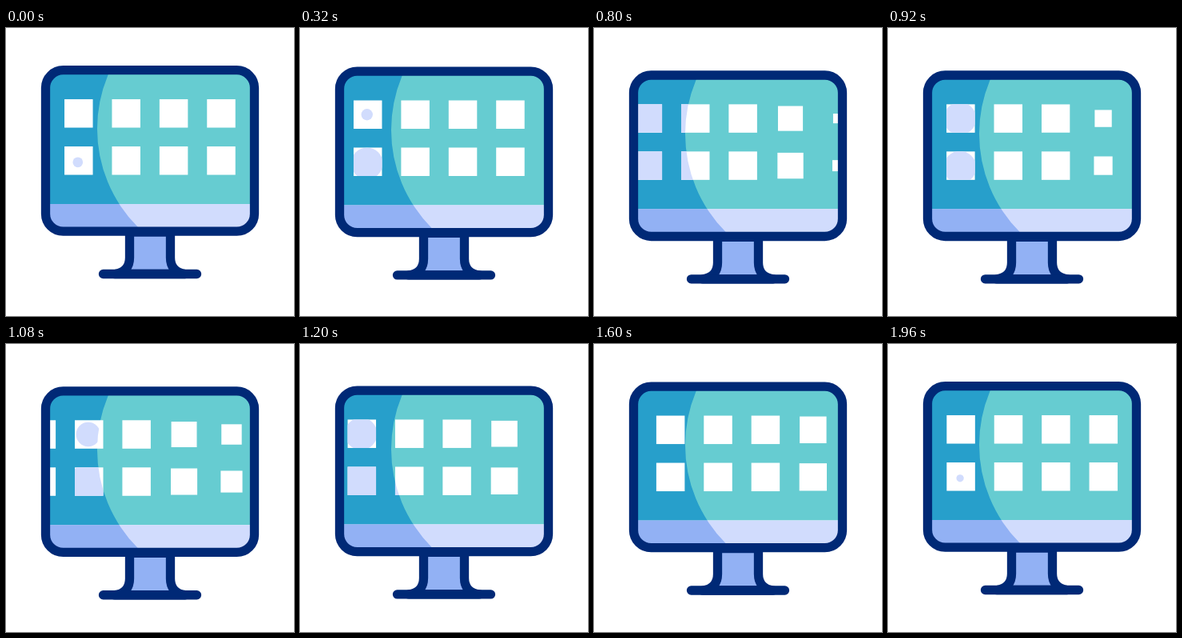
An HTML page with a canvas for the animation above (2 s loop, 360 px wide and 360 px high).

```html
<!DOCTYPE html>
<html lang="en">
<head>
<meta charset="utf-8">
<title>App carousel on a monitor</title>
<style>
html, body { margin: 0; width: 100%; height: 100%; overflow: hidden; background: #fff; }
canvas { display: block; width: 360px; height: 360px; }
</style>
</head>
<body>
<canvas id="stage" width="360" height="360"></canvas>
<script>
const ctx = document.getElementById('stage').getContext('2d');
const LOOP = 2000, PITCH = 59.4, SIZE = 35.5;
const NAVY = '#002976', TEAL = '#66ccd1', BLUE = '#279fcb', PALE = '#d1dcfd', SHADE = '#92b1f4';

// Scroll distance over time: four columns per loop
const SCROLL = [[0, 0], [320, 6], [600, 37], [800, 82.6], [1080, 165],
  [1360, 217], [1700, 236], [1960, 237.3], [2000, 237.6]];
// When each incoming column starts to grow
const GROW = { 4: 270, 5: 535, 6: 640, 7: 1020 };
// Tint ripples per column: start of upper row, start of lower row, end
const TINT = [[[150, -150, 9999]], [[0, 0, 9999]], [[150, 100, 880]],
  [[720, 500, 9999]], [[600, 600, 1400], [2150, 1850, 9999]]];

const clamp = x => Math.max(0, Math.min(1, x));
const ease = (t, start, span) => {
  const x = clamp((t - start) / span);
  return x * x * (3 - 2 * x);
};

// Smooth curve through key points
function curve(keys, t) {
  const last = keys.length - 1;
  const slope = i => i === 0 || i === last ? 0 :
    (keys[i + 1][1] - keys[i - 1][1]) / (keys[i + 1][0] - keys[i - 1][0]);
  let i = 0;
  while (i < last - 1 && t > keys[i + 1][0]) i++;
  const [t0, a] = keys[i], [t1, b] = keys[i + 1];
  const d = t1 - t0, x = (t - t0) / d, y = 1 - x;
  return a * (1 + 2 * x) * y * y + b * x * x * (3 - 2 * x) +
    d * x * y * (slope(i) * y - slope(i + 1) * x);
}

function tintRadius(col, row, t) {
  return Math.max(0, ...(TINT[col] || []).map(p =>
    Math.min(28, Math.max(0, t - p[row]) * 0.042) * (1 - clamp((t - p[2]) / 150))));
}

function fill(color, x, y, w, h) {
  ctx.fillStyle = color;
  ctx.fillRect(x, y, w, h);
}

function clipped(path, rule, draw) {
  ctx.save();
  ctx.clip(path, rule);
  draw();
  ctx.restore();
}

const frame = new Path2D();
frame.roundRect(49.5, 52.7, 261, 201.5, 22);
const shadow = new Path2D('M0 0H360V360H0Z');
shadow.arc(288, 126, 174, 0, 7);
const neck = new Path2D('M154.5 255V287C154.5 298 149 306 136 307.5H224C211 306 205.5 298 205.5 287V255Z');
const base = new Path2D('M121.5 307.5H238.5');

function eachSquare(t, draw) {
  const shift = curve(SCROLL, t);
  for (let col = 0; col < 8; col++) {
    for (let row = 0; row < 2; row++) {
      const size = SIZE * (col < 4 ? 1 : ease(t, GROW[col] - row * 25, 680));
      draw(90.8 + col * PITCH - shift, 106.8 + row * 59, size, col, row);
    }
  }
}

function drawScreen(t) {
  fill(TEAL, 44, 47, 272, 173);
  fill(PALE, 44, 220, 272, 40);
  clipped(shadow, 'evenodd', () => {
    fill(BLUE, 44, 47, 272, 173);
    fill(SHADE, 44, 220, 272, 40);
  });
  eachSquare(t, (x, y, s) => fill('#fff', x - s / 2, y - s / 2, s, s));
  clipped(shadow, 'evenodd', () => eachSquare(t, (x, y, s, col, row) => {
    const r = tintRadius(col, row, t);
    if (!r) return;
    const box = new Path2D();
    box.rect(x - s / 2, y - s / 2, s, s);
    clipped(box, 'nonzero', () => {
      ctx.fillStyle = PALE;
      ctx.beginPath();
      ctx.arc(x - 1, y + row * 2, r, 0, 7);
      ctx.fill();
    });
  }));
}

function draw(t) {
  fill('#fff', 0, 0, 360, 360);
  ctx.save();
  ctx.translate(0, 6.3 * (ease(t, 110, 680) - ease(t, 1040, 680)));
  ctx.strokeStyle = NAVY;
  ctx.lineWidth = 11.3;
  ctx.lineCap = ctx.lineJoin = 'round';
  ctx.fillStyle = SHADE;
  ctx.fill(neck);
  ctx.stroke(neck);
  ctx.stroke(base);
  clipped(frame, 'nonzero', () => drawScreen(t));
  ctx.stroke(frame);
  ctx.restore();
}

const begin = performance.now();
function tick() {
  draw((performance.now() - begin) % LOOP);
  requestAnimationFrame(tick);
}
tick();
</script>
</body>
</html>
```
